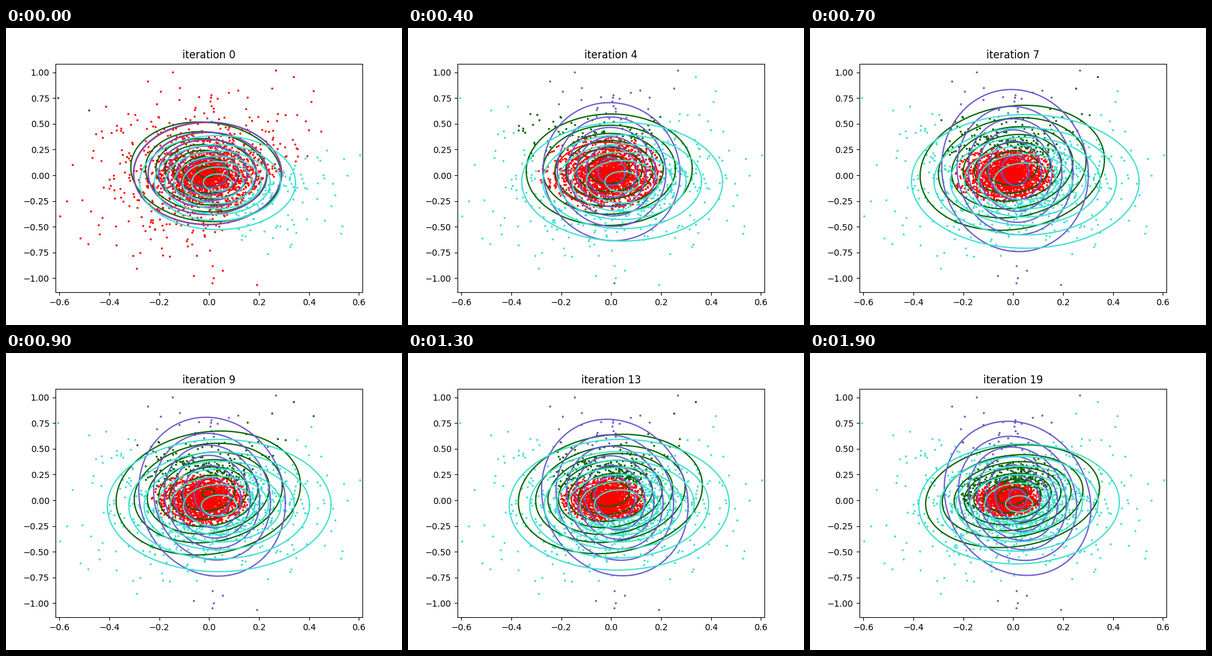
Recreate the animation shown at these times as a matplotlib script. Size 640 px wide and 480 px high, loop 2 s.

```python
import numpy as np
import matplotlib.pyplot as plt
from matplotlib.animation import FuncAnimation
from matplotlib.colors import to_rgba
from matplotlib.ticker import MaxNLocator

ITERATIONS = 20
TURN = 7  # iteration at which the clusters are widest


class Cluster:
    """Gaussian moving through three poses: mean x, mean y, sigma x, sigma y, correlation."""

    def __init__(self, color, weight, start, middle, end, rise, fall, squeeze=0):
        self.color, self.weight, self.squeeze = color, weight, squeeze
        self.poses = np.array([start, middle, end])
        self.rise, self.fall = rise, fall

    def pose(self, i):
        start, middle, end = self.poses
        u = min(i / TURN, 1)
        v = max(i - TURN, 0) / (ITERATIONS - 1 - TURN)
        p = start + (middle - start) * u ** self.rise + (end - middle) * v ** self.fall
        p[2] *= 1 - self.squeeze * np.sin(np.pi * u)
        return p

    def score(self, xy, i):
        """Weighted log density."""
        mx, my, sx, sy, rho = self.pose(i)
        u, v = (xy[:, 0] - mx) / sx, (xy[:, 1] - my) / sy
        k = 1 - rho * rho
        return self.weight - np.log(sx * sy * np.sqrt(k)) - (u * u + v * v - 2 * rho * u * v) / (2 * k)

    def rings(self, i):
        """Curves of equal density at round levels, joined with gaps."""
        mx, my, sx, sy, rho = self.pose(i)
        k = np.sqrt(1 - rho * rho)
        peak = 1 / (2 * np.pi * sx * sy * k)
        levels = MaxNLocator(8, min_n_ticks=1).tick_values(0, peak)
        levels = levels[(levels > 0) & (levels < peak)]
        r = np.sqrt(2 * np.log(peak / levels))[:, None]
        t = np.append(np.linspace(0, 2 * np.pi, 121), np.nan)
        x = mx + sx * r * np.cos(t)
        y = my + sy * r * (rho * np.cos(t) + k * np.sin(t))
        return x.ravel(), y.ravel()


CLUSTERS = [
    Cluster("red", .55, (-.006, .018, .150, .2505, 0), (-.03, .005, .083, .110, 0),
            (-.025, .008, .051, .060, 0), rise=.9, fall=1),
    Cluster("darkgreen", -.33, (-.0124, .034, .1519, .2438, -.09), (-.0037, .073, .1877, .3084, .13),
            (-.0025, .040, .1740, .2491, .15), rise=1.2, fall=1.5),
    Cluster("slateblue", -.75, (-.0074, .019, .1503, .2531, 0), (.0074, .046, .1525, .4087, -.05),
            (.0174, .019, .1478, .3765, -.13), rise=.9, fall=.5, squeeze=.065),
    Cluster("turquoise", 0, (.0335, -.071, .1557, .2276, 0), (.0484, -.059, .2317, .3297, 0),
            (.0236, -.035, .2103, .3051, .03), rise=.62, fall=.6),
]


def make_points(n=2500):
    """Heavy-tailed cloud: each point draws its own spread."""
    rng = np.random.default_rng(11)
    spread = rng.lognormal(0, .62, (n, 1))
    xy = (-.03, .01) + spread * rng.normal((.018, -.008), (.1, .167), (n, 2))
    inside = (abs(xy) < (.61, 1.1)).all(axis=1) & (np.hypot(xy[:, 0] / .65, xy[:, 1] / 1.15) < 1)
    return np.vstack([xy[inside], (-.605, .75)])


points = make_points()
palette = np.array([to_rgba(c.color) for c in CLUSTERS])

fig, ax = plt.subplots(figsize=(6.4, 4.8), dpi=100)
ax.set_xlim(-.61595, .61395)
ax.set_ylim(-1.1366, 1.0844)
dots = ax.scatter(points[:, 0], points[:, 1], s=2)
curves = [ax.plot([], [], color=c.color, lw=1.5)[0] for c in CLUSTERS]
title = ax.set_title("iteration 0")


def update(i):
    winner = np.argmax([c.score(points, i) for c in CLUSTERS], axis=0)
    dots.set_color(palette[winner])
    for curve, cluster in zip(curves, CLUSTERS):
        curve.set_data(*cluster.rings(i))
    title.set_text(f"iteration {i}")
    return [dots, title, *curves]


anim = FuncAnimation(fig, update, frames=ITERATIONS, interval=100, repeat=True, repeat_delay=0)
plt.show()
```
